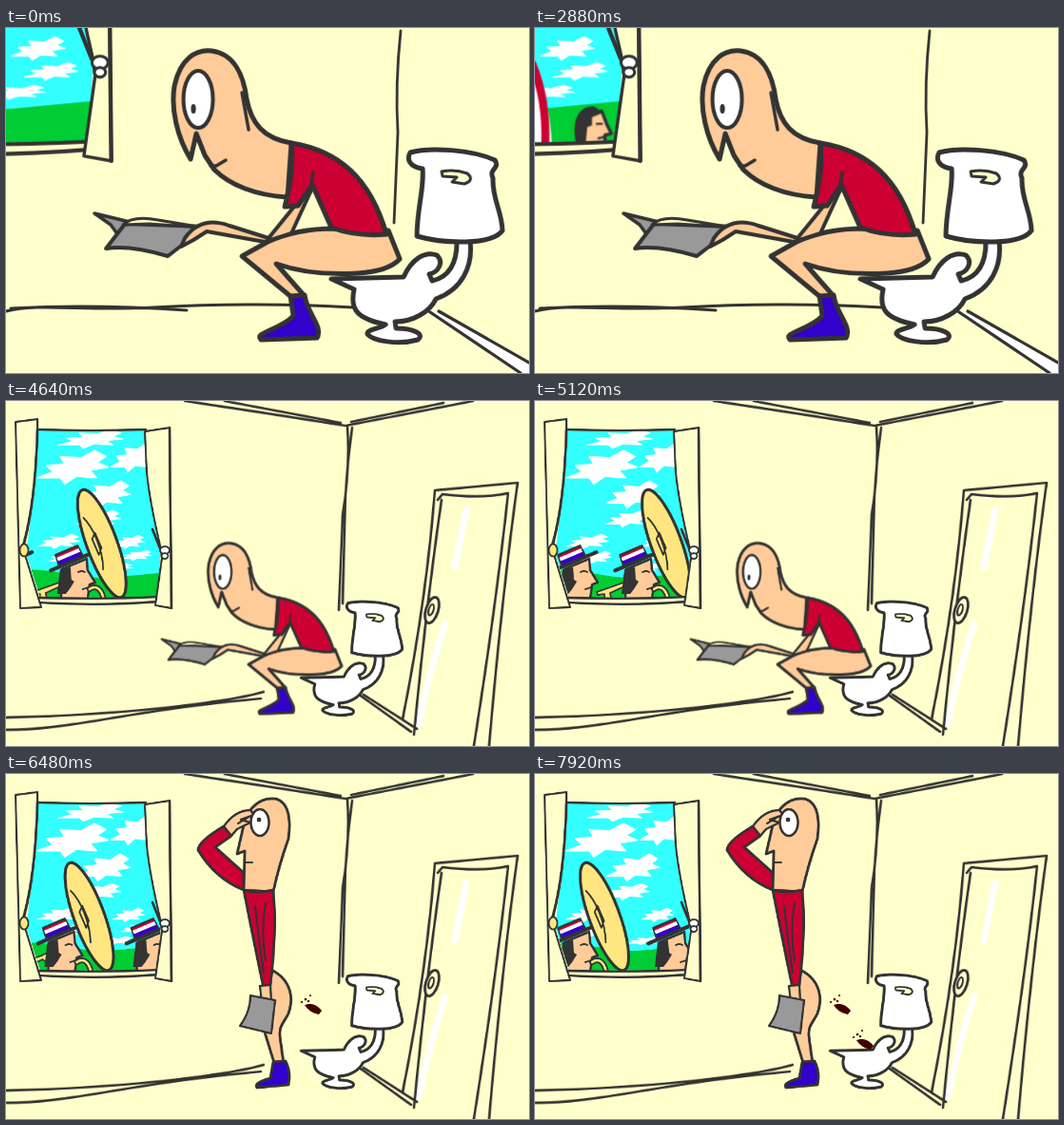
Write an HTML page that moves like this. It is 550x363 px and loops after 8 s.

```html
<!DOCTYPE html>
<html lang="en">
<head>
<meta charset="utf-8">
<title>Parade outside the bathroom</title>
<style>
html, body { margin: 0; width: 100%; height: 100%; overflow: hidden; background: #ffffcc; }
svg { display: block; width: 100vw; height: 100vh; }
path, ellipse, circle { stroke-linejoin: round; stroke-linecap: round; }
.ink { stroke: #333; }
.line { fill: none; stroke: #333; }
.wall { fill: #ffffcc; }
.skin { fill: #ffcc99; }
.red { fill: #cc0033; }
.blue { fill: #3300cc; }
.white { fill: #fff; }
.gray { fill: #999; }
.brass { fill: #ffe680; }
.dark { fill: #333; }
.mess { fill: #400000; }

#camera { animation: camera 8s step-end infinite; }
.near { animation: near 8s step-end infinite; }
.far { animation: far 8s step-end infinite; }
.sit { animation: sit 8s step-end infinite; }
.stand { animation: stand 8s step-end infinite; }
.half { animation: half 8s step-end infinite; }
.shut { animation: shut 8s step-end infinite; }
#leader { animation: lead 8s infinite; }
#band { animation: march 8s infinite; }
.drop { opacity: 0; animation: drop 8s infinite; }
#spray { animation: spray 8s step-end infinite; }

@keyframes camera {
  0% { transform: matrix(1.695, 0, 0, 1.695, -184.2, -229.7); }
  44%, 100% { transform: none; }
}
@keyframes near { 0% { opacity: 1; } 44%, 100% { opacity: 0; } }
@keyframes far { 0% { opacity: 0; } 44%, 100% { opacity: 1; } }
@keyframes sit { 0% { opacity: 1; } 69%, 100% { opacity: 0; } }
@keyframes stand { 0% { opacity: 0; } 69%, 100% { opacity: 1; } }
@keyframes half {
  0%, 7%, 24%, 80%, 93%, 100% { opacity: 0; }
  5%, 22%, 78%, 91% { opacity: 1; }
}
@keyframes shut {
  0%, 8%, 25%, 81%, 94%, 100% { opacity: 0; }
  7%, 24%, 80%, 93% { opacity: 1; }
}
/* marching advances in 80 ms steps */
@keyframes lead {
  0% { transform: translateX(-48.6px); animation-timing-function: step-end; }
  28% { transform: translateX(-48.6px); animation-timing-function: steps(27); }
  55%, 100% { transform: translateX(115.5px); }
}
@keyframes march {
  0% { transform: translateX(-93px); animation-timing-function: step-end; }
  49% { transform: translateX(-93px); animation-timing-function: steps(15); }
  64% { transform: translateX(0); animation-timing-function: steps(10); }
  74% { transform: translateX(62px); animation-timing-function: steps(14); }
  88% { transform: translateX(153px); animation-timing-function: steps(12); }
  100% { transform: translateX(273px); }
}
@keyframes drop {
  0% { opacity: 1; transform: translate(300px, 238px); animation-timing-function: steps(2); }
  2% { opacity: 1; transform: translate(323px, 247px); animation-timing-function: steps(3); }
  5% { opacity: 1; transform: translate(347px, 284px); animation-timing-function: step-end; }
  7%, 100% { opacity: 0; transform: translate(347px, 284px); }
}
@keyframes spray { 0%, 91%, 100% { opacity: 0; } 87% { opacity: 1; } }
</style>
</head>
<body>
<svg viewBox="0 0 550 363" preserveAspectRatio="none">
<defs>
  <clipPath id="pane"><path d="M33 30H147Q150 100 163 152L160 207H36L21 160Q30 100 33 30Z"/></clipPath>
  <path id="cloud" d="M0 18L14 14 8 10 24 9 20 4 38 5 50 0 60 4 52 8 62 11 46 13 52 18 34 17 24 22 20 18Z" fill="#fff" stroke="#fff"/>
  <path id="star" d="M0-5 1.4-1.5 5-1 2 1 3 5 0 2.5-3 5-2 1-5-1-1.4-1.5Z" fill="#fff"/>
  <g id="marcher">
    <path class="skin ink" stroke-width="2.4" d="M-14-8L12-19 13-7 21 6 15 8 13 23H-15Z"/>
    <path class="dark" d="M-16-8L-5-10-4 3-1 5-6 13-10 18H-19Z"/>
    <path class="line" stroke-width="1.8" d="M3-5Q7-7 10-5M8 13L14 11"/>
    <g transform="translate(-4 -17) rotate(-23)">
      <path class="red ink" stroke-width="2.2" d="M-14 0L-13-12H12L13 0Z"/>
      <path class="white" d="M-13-9H12V-5H-13Z"/>
      <path class="blue" d="M-13-5H12V0H-13Z"/>
      <path class="line" stroke-width="4" d="M-24 1H25"/>
    </g>
  </g>
  <g id="trumpeter">
    <use href="#marcher"/>
    <path class="brass ink" stroke-width="1.6" d="M20 16L48 6 56 2V16L49 10 34 17 35 23H28V18L21 19Z"/>
  </g>
  <g id="tubist">
    <use href="#marcher"/>
    <path fill="none" stroke="#333" stroke-width="6" d="M15 13C22 8 28 13 30 24"/>
    <path fill="none" stroke="#ffe680" stroke-width="2.5" d="M15 13C22 8 28 13 30 24"/>
    <g transform="translate(28 -35) rotate(-20)">
      <ellipse class="brass ink" stroke-width="3" rx="16" ry="60"/>
      <path class="line" stroke-width="1.8" d="M-9-32C-3-20-1 6-8 26M-8-8L-3-13-2 4-7 10Z"/>
    </g>
  </g>
</defs>

<g id="camera">
  <path class="wall" d="M0 0H550V363H0Z"/>

  <g clip-path="url(#pane)">
    <path fill="#33ffff" d="M0 20H180V220H0Z"/>
    <use href="#cloud" transform="translate(33 52) scale(1.2 1.6)"/>
    <use href="#cloud" transform="translate(55 30) scale(1.1 .9)"/>
    <use href="#cloud" transform="translate(110 44) scale(.75 1.4)"/>
    <use href="#cloud" transform="translate(75 84) scale(.9 1.3)"/>
    <use href="#cloud" transform="translate(74 115) scale(.75 .8)"/>
    <use href="#cloud" transform="translate(33 140) scale(.72 .7)"/>
    <use href="#cloud" transform="translate(44 158) scale(.6 .6)"/>
    <use href="#cloud" transform="translate(112 141) scale(.54 .66)"/>
    <use href="#cloud" transform="translate(120 157) scale(.54 .5)"/>
    <use href="#cloud" transform="translate(96 171) scale(.6 .4)"/>
    <path fill="#00cc33" d="M0 177Q35 176 65 182T120 185 180 180V220H0Z"/>

    <g id="leader">
      <path class="skin ink" stroke-width="2" d="M139 188L150 187 153 195 156 201 152 202 152 210H137Z"/>
      <path class="dark" d="M134 207C131 192 136 184 145 184L151 188 144 191 144 196 141 197 140 208Z"/>
      <path class="line" stroke-width="1.4" d="M147 195H150M148 204L152 203"/>
      <path class="white" d="M55 72C78 80 98 115 108 158Q118 180 119 208H57Z"/>
      <path class="blue" d="M55 72C72 78 80 95 84 150L57 193Z"/>
      <path fill="none" stroke="#cc0033" stroke-width="5" d="M58 205C70 170 78 165 84 150M72 208Q90 175 92 130M86 208Q100 170 94 108M100 208Q105 175 103 145M115 208Q116 180 107 158"/>
      <use href="#star" x="65" y="100"/><use href="#star" x="70" y="125"/><use href="#star" x="63" y="158"/>
      <use href="#star" x="74" y="105"/><use href="#star" x="66" y="132"/>
      <path class="line" stroke-width="2" d="M55 70L58 208M55 72C78 80 98 115 108 158"/>
      <circle class="dark" cx="54" cy="68" r="7"/>
    </g>

    <g id="band">
      <use href="#tubist" x="-218" y="185"/>
      <use href="#trumpeter" x="-118" y="185"/>
      <use href="#tubist" x="-48" y="185"/>
      <use href="#trumpeter" x="45" y="185"/>
      <use href="#tubist" x="110" y="185"/>
    </g>
  </g>

  <path class="wall" d="M32 207H162V213H32Z"/>
  <path class="line" stroke-width="2.4" d="M34 207Q100 209 161 206M34 212Q100 216 160 211M33 30Q90 32 147 30"/>
  <g class="wall ink" stroke-width="2">
    <path d="M10 22L33 19V30Q31 105 18 151L21 165 37 217 15 218Z"/>
    <path d="M146 32L172 28 174 218 157 215 164 165 162 152Q151 105 148 75Z"/>
  </g>
  <path class="line" stroke-width="2.6" d="M33 30Q31 105 19 150M154 135L162 155M172 28L174 218"/>
  <g class="ink" stroke-width="1.8">
    <ellipse class="brass" cx="19" cy="157" rx="4.5" ry="6.5"/>
    <ellipse class="white" cx="167" cy="157" rx="5" ry="4"/>
    <ellipse class="white" cx="167" cy="163" rx="3.5" ry="3"/>
  </g>

  <g class="far">
    <path fill="none" stroke="#fff" stroke-width="7" d="M462 234Q445 285 434 340M484 115L472 175"/>
    <path class="line" stroke-width="2.5" d="M188 0Q270 12 357 26L491 0M363 22L460 2M230 0L352 23M359 27Q362 70 354 120L350 220M364 28Q359 65 357 100L354 213M0 333Q90 331 165 323T271 306M0 346C70 346 125 326 268 313"/>
    <path class="line" stroke-width="2.6" d="M370 308L426 348M376 309L432 345M451 94L538 86Q521 210 508 363M451 94Q442 210 417 335M454 104L459 98Q500 103 528 97Q516 210 492 363M458 104Q442 215 429 351"/>
    <g class="wall ink" transform="rotate(17 448 220)">
      <ellipse cx="448" cy="220" rx="6.5" ry="14" stroke-width="2.8"/>
      <ellipse cx="447" cy="220" rx="2.5" ry="6" stroke-width="2"/>
    </g>
  </g>

  <g transform="translate(108.7 135.5) scale(.59)">
    <g class="near">
      <path class="line" stroke-width="3" d="M0 298C35 289 80 298 155 294S300 290 365 294M5 295Q90 290 190 297"/>
      <path class="line" stroke-width="2.8" d="M415 3Q409 60 412 110L408 205"/>
      <path class="white" d="M443 297L458 299 550 352V363H540Z"/>
      <path class="line" stroke-width="3.2" d="M443 297L541 363M455 298L550 352"/>
    </g>

    <g class="white ink" stroke-width="5">
      <path d="M342 264L418 262C426 244 440 234 453 239C461 247 454 257 445 259L448 266Q475 260 474 222L488 225C491 250 480 275 452 285C445 299 428 309 409 309L410 316C428 316 441 322 433 328C412 334 385 329 380 322C379 317 392 317 399 312C370 306 361 297 366 275Z"/>
      <path d="M425 131C445 125 490 128 514 139C520 148 507 148 512 158C511 180 521 191 522 213C511 229 460 227 432 219C432 190 440 168 438 148C424 146 421 138 425 131Z"/>
      <path class="wall" stroke-width="3" d="M458 151Q472 148 485 153Q493 160 482 164L469 162 474 157 459 156Z"/>
    </g>

    <g class="sit">
      <g class="ink" stroke-width="5">
        <path class="skin" d="M248 240L275 225Q305 211 345 211L402 213 414 243Q402 256 370 258Q320 261 284 248L313 281 300 283Z"/>
        <path class="blue" d="M299 282L314 281C316 300 334 314 327 326L268 328C260 320 288 318 302 303Z"/>
        <path class="gray" stroke-width="3.5" d="M93 195L130 204 118 218 110 207Z"/>
        <path class="gray" stroke-width="4" d="M105 232L125 206 210 209 170 240Q130 228 105 232Z"/>
        <path class="wall" stroke-width="3" d="M123 207Q133 197 160 202L208 210 150 206Z"/>
        <path class="skin" stroke-width="4" d="M306 184L276 221 235 208Q205 197 188 221L184 230 197 223 211 214 272 225 300 216 323 166Z"/>
        <path class="skin" d="M194 138C180 115 173 85 177 61C183 32 200 22 216 24C240 27 250 50 253 75C258 100 270 116 300 121L296 178C262 176 235 165 219 149L209 134 200 111Z"/>
        <path class="red" d="M300 121C350 129 383 158 400 217Q370 220 342 210L322 165 307 187 293 188Q303 150 300 121Z"/>
      </g>
      <path class="line" stroke-width="3.5" d="M248 68L255 107M215 145L221 145 231 139M323 152L320 172"/>
      <g transform="translate(202 75)">
        <ellipse class="white ink" rx="15.5" ry="30" stroke-width="4"/>
        <ellipse class="dark" cx="-5" cy="10" rx="2.6" ry="5"/>
        <g class="half">
          <ellipse class="skin ink" rx="15.5" ry="30" stroke-width="4"/>
          <path class="white ink" stroke-width="3" d="M-15 0Q0-16 15 0Q0 16-15 0Z"/>
          <circle class="dark" cx="-5" cy="2" r="3"/>
        </g>
        <g class="shut">
          <ellipse class="skin" rx="18" ry="33"/>
          <path class="line" stroke-width="4" d="M-15 2Q0 9 15 2"/>
        </g>
      </g>
    </g>
  </g>

  <g class="stand">
    <g class="ink" stroke-width="2.8">
      <path class="skin" d="M277 205C297 214 304 232 297 252C292 262 287 265 288 276L292 305 282 304 270 265 271 220Z"/>
      <path class="blue" d="M281 303L294 302Q300 314 297 327L264 330Q260 325 278 320Z"/>
      <path class="skin" d="M250 122L251 81 243 84 249 58C252 38 266 24 283 26C297 29 300 47 297 68Q287 96 281 124Z"/>
      <path class="red" d="M250 122Q265 126 281 122Q285 165 278 222L271 226Q261 178 250 122Z"/>
      <path class="red" d="M250 122Q220 110 202 80Q202 71 229 55L237 65 220 77 250 104Z"/>
      <path class="skin" stroke-width="2.3" d="M229 55Q241 38 257 38L261 43 247 48 257 51 243 58 237 65Z"/>
      <path class="skin" stroke-width="2.2" d="M267 223L278 222 279 240 269 241Z"/>
      <path class="gray" stroke-width="2.2" d="M257 233L283 238 279 273 246 265Q257 250 257 233Z"/>
    </g>
    <path class="line" stroke-width="2" d="M262 139Q266 175 271 209M273 136Q268 165 273 196M252 93L259 93M244 52L254 46"/>
    <g transform="translate(267 51)">
      <ellipse class="white ink" rx="9.5" ry="14" stroke-width="2.5"/>
      <circle class="dark" cx="-1" cy="-3" r="2.3"/>
      <g class="half">
        <ellipse class="skin ink" rx="9.5" ry="14" stroke-width="2.5"/>
        <path class="white ink" stroke-width="1.8" d="M-9 0Q0-8 9 0Q0 8-9 0Z"/>
      </g>
      <g class="shut">
        <ellipse class="skin" rx="10.5" ry="15.5"/>
        <path class="line" stroke-width="2.4" d="M-9 1Q0 5 9 1"/>
      </g>
    </g>
    <g id="drops"></g>
    <g id="spray"><path class="mess" d="M318 281Q325 274 331 283L327 289 318 288Z"/></g>
  </g>
</g>
</svg>
<script>
const byId = id => document.getElementById(id);

const drop = start => `<g class="drop" style="animation-delay:${start - 8}s">
  <path class="mess" d="M-9-4Q1-8 9 2L6 6Q-4 4-9-4Z"/>
  <g class="mess"><circle cx="-8" cy="-10" r="1.3"/><circle cx="-12" cy="-7" r="1"/>
  <circle cx="-3" cy="-14" r="1"/><circle cx="-5" cy="-8" r="1.2"/></g></g>`;
byId("drops").innerHTML = [5.76, 6.32, 7.44, 7.76].map(drop).join("");

let seed = 7;
const random = () => (seed = seed * 16807 % 2147483647) / 2147483647;
const speck = () => {
  const along = random(), x = 317 + along * 30 + random() * 7, y = 241 + along * 28 + random() * 9;
  return `<circle class="mess" cx="${x}" cy="${y}" r="${0.7 + random() * 1.3}"/>`;
};
byId("spray").insertAdjacentHTML("beforeend", Array.from({ length: 42 }, speck).join(""));
</script>
</body>
</html>
```
